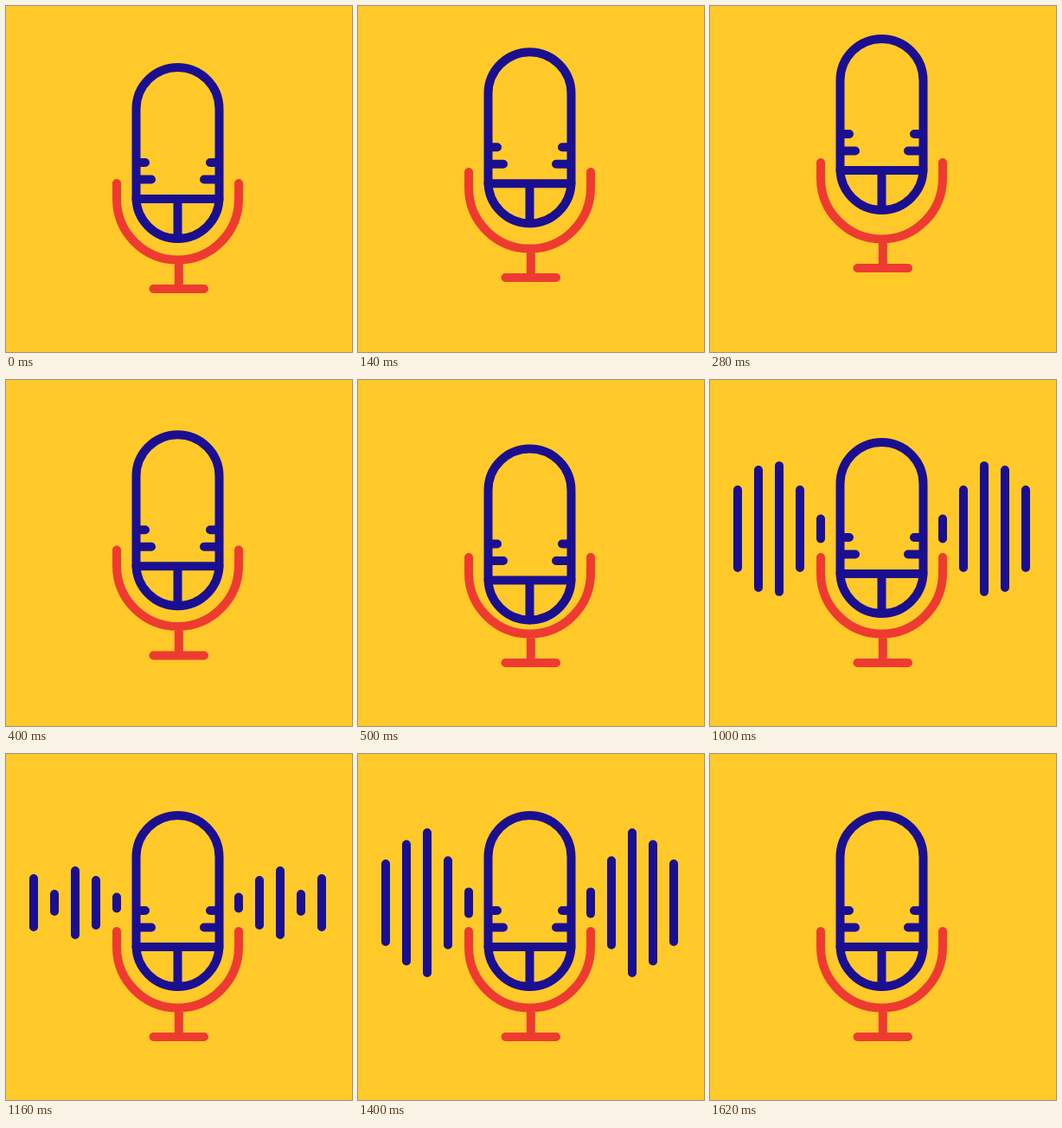
Animation, 400 px wide and 400 px high, one loop 1.64 s. Source, as an HTML page:

```html
<!DOCTYPE html>
<html lang="en">
<head>
<meta charset="utf-8">
<title>Microphone</title>
<style>
html, body { margin: 0; width: 100%; height: 100%; overflow: hidden; background: #ffc929; }
svg { display: block; width: 100%; height: 100%; }
</style>
</head>
<body>
<svg viewBox="0 0 400 400" fill="none" stroke-width="10" stroke-linecap="round">
  <rect width="400" height="400" fill="#ffc929"/>
  <path id="waves" stroke="#1b0f91"/>
  <path id="stand" stroke="#ee3b31" d="M128 205V223A70.5 70.5 0 0 0 269 223V205M199.8 294V327M170.5 327H229"/>
  <g id="mic" stroke="#1b0f91">
    <rect x="150.5" y="71" width="96" height="198" rx="48"/>
    <path d="M150.5 223H246.5M198.5 223V269M151 181H161M151 200.5H168M246 181H236M246 200.5H229"/>
  </g>
</svg>
<script>
const LOOP = 1640;
const MID = 198.5;
const WAVE_Y = 172;
const [mic, stand, waves] = ['mic', 'stand', 'waves'].map(id => document.getElementById(id));

// Keys are [time, value] pairs
const micKeys = [[0, 0], [270, -33.2], [500, 8.5], [660, -3], [790, 0], [960, 1.2], [1120, 0]];
const standKeys = [[0, 0], [270, -24.2], [490, 0]];

// Half lengths of the bars, from the outermost inwards
const waveTimes = [550, 760, 1010, 1160, 1350, 1600];
const waveSizes = [
  [0, 11, 45, 28, 50, 0],
  [0, 30, 68, 10, 75, 0],
  [0, 23, 73, 37, 90, 0],
  [0, 16, 45, 26, 54, 0],
  [0, 5.5, 11.5, 6.5, 14, 0]
];
const waveKeys = waveSizes.map(list => list.map((v, i) => [waveTimes[i], v]));

function valueAt(keys, t) {
  if (t <= keys[0][0]) return keys[0][1];
  for (let i = 1; i < keys.length; i++) {
    const [t0, a] = keys[i - 1], [t1, b] = keys[i];
    if (t < t1) return a + (b - a) * (1 - Math.cos(Math.PI * (t - t0) / (t1 - t0))) / 2;
  }
  return keys[keys.length - 1][1];
}

function shift(el, y) {
  el.setAttribute('transform', `translate(0 ${y.toFixed(2)})`);
}

function draw(t) {
  shift(mic, valueAt(micKeys, t));
  shift(stand, valueAt(standKeys, t));
  let d = '';
  waveKeys.forEach((keys, i) => {
    const h = valueAt(keys, t);
    if (h < 0.05) return;
    const dx = 166.5 - i * 24;
    for (const x of [MID - dx, MID + dx]) d += `M${x} ${WAVE_Y - h}V${WAVE_Y + h}`;
  });
  waves.setAttribute('d', d);
}

const start = performance.now();
function tick() {
  draw((performance.now() - start) % LOOP);
  requestAnimationFrame(tick);
}
draw(0);
requestAnimationFrame(tick);
</script>
</body>
</html>
```
